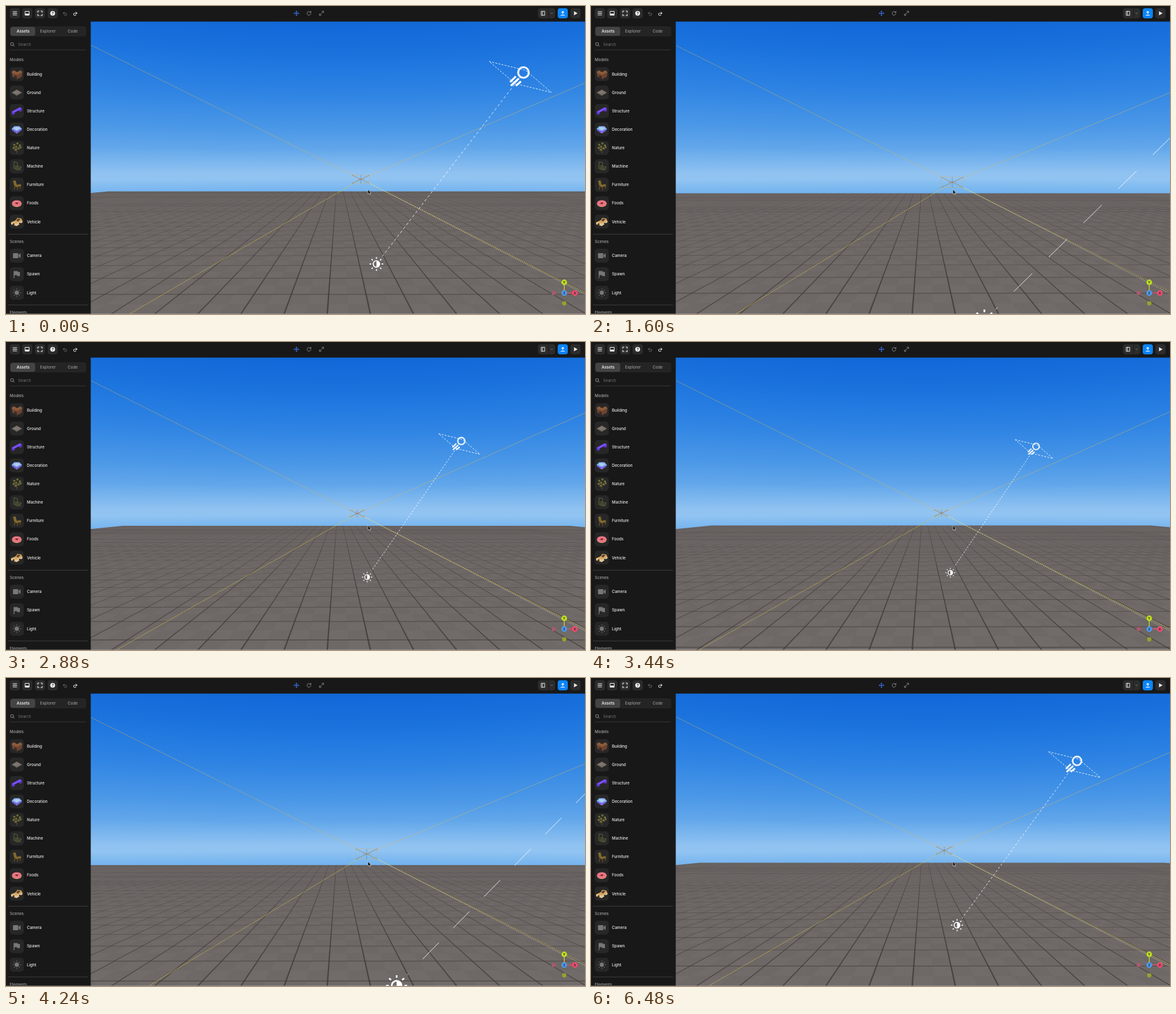
These frames come from a looping animation (912 by 486 pixels, 6.56 s). An HTML page with a canvas:

```html
<!DOCTYPE html>
<html lang="en">
<head>
<meta charset="utf-8">
<title>Scene editor</title>
<style>
html, body { margin: 0; width: 100%; height: 100%; overflow: hidden; background: #171717; }
canvas, svg { position: absolute; left: 0; top: 0; width: 912px; height: 486px; display: block; }
text { font-family: Inter, Roboto, sans-serif; font-size: 6.2px; font-weight: 500; fill: #ececec; }
</style>
</head>
<body>
<canvas id="view" width="912" height="486"></canvas>
<svg id="ui" viewBox="0 0 912 486"></svg>
<script>
const LOOP = 6560, STEP = 80;
const VX = 523, VY = 258, HORIZON = 256;
const g = document.getElementById('view').getContext('2d');

// Camera travel over time: [ms, distance]
const keys = [[0, .289], [800, .567], [1600, .555], [2400, .172], [3440, 0], [4240, .534],
  [5120, .3], [5500, .296], [5840, .318], [6480, .197], [6560, .289]];
const slope = i => (keys[i + 1][1] - keys[i][1]) / (keys[i + 1][0] - keys[i][0]);
const tangents = keys.map((_, i) => {
  if (!i || i === keys.length - 1) return 0;
  const a = slope(i - 1), b = slope(i);
  return a * b > 0 ? 2 * a * b / (a + b) : 0;
});
tangents[0] = slope(0);
tangents[keys.length - 2] = slope(keys.length - 3);

function travel(t) {
  let i = 0;
  while (i < keys.length - 2 && t >= keys[i + 1][0]) i++;
  const [t0, a] = keys[i], [t1, b] = keys[i + 1], h = t1 - t0, u = (t - t0) / h;
  const s = u * u * (3 - 2 * u);
  return a + (b - a) * s + h * u * (1 - u) * (tangents[i] * (1 - u) - tangents[i + 1] * u);
}

function path(points, close) {
  g.beginPath();
  points.forEach(([x, y], i) => i ? g.lineTo(x, y) : g.moveTo(x, y));
  if (close) g.closePath();
}
function stroke(points, color, width, dash = [], close = false) {
  g.strokeStyle = color;
  g.lineWidth = width;
  g.setLineDash(dash);
  path(points, close);
  g.stroke();
  g.setLineDash([]);
}
function gradient(y0, y1, stops) {
  const grad = g.createLinearGradient(0, y0, 0, y1);
  stops.forEach(([y, c]) => grad.addColorStop((y - y0) / (y1 - y0), c));
  return grad;
}

const sky = gradient(24, 296, [[24, '#1167d7'], [80, '#1b73de'], [140, '#2f84e3'], [190, '#4896e7'],
  [225, '#61a6ea'], [246, '#7bb6ee'], [263, '#90c2f1'], [272, '#92c4f2'], [284, '#7fbaf0'], [296, '#70b1ee']]);
const earth = gradient(289, 486, [[289, '#696362'], [340, '#6e6867'], [486, '#716b6a']]);

const TILE = .0904, FOCUS = 400, DROP = 122.3, NEAR = .525, LEFT = -3.04, RIGHT = 3.28, FAR = 3.65;
const px = (x, z) => VX + FOCUS * x / z;
const py = z => HORIZON + DROP / z;

// Bands of the dome rise towards the sides
function drawSky() {
  g.fillStyle = sky;
  for (let x = 132; x < 912; x += 4) {
    const bend = Math.hypot(1, (x + 2 - VX) / 750);
    g.save();
    g.translate(0, HORIZON);
    g.scale(1, bend);
    g.translate(0, -HORIZON);
    g.fillRect(x, 20, 4, 280);
    g.restore();
  }
}

function quad(x0, x1, z0, z1) {
  g.moveTo(px(x0, z0), py(z0));
  g.lineTo(px(x1, z0), py(z0));
  g.lineTo(px(x1, z1), py(z1));
  g.lineTo(px(x0, z1), py(z1));
  g.closePath();
}

function drawGround(d) {
  const far = FAR - d, x0 = -.0226, z0 = 1.175 - d, half = TILE / 2;
  g.beginPath();
  quad(LEFT, RIGHT, far, NEAR);
  g.fillStyle = earth;
  g.fill();

  // faint checks
  g.beginPath();
  for (let r = Math.floor((NEAR - z0) / half); z0 + r * half < 1.9; r++) {
    const za = Math.max(NEAR, z0 + r * half), zb = z0 + (r + 1) * half;
    const reach = Math.ceil(zb / half) + 1;
    const row = r + 1000;
    for (let c = -reach; c <= reach; c++)
      if ((c + row) & 1) quad(x0 + c * half, x0 + (c + 1) * half, zb, za);
  }
  g.fillStyle = 'rgba(30,24,22,.04)';
  g.fill();

  // grid
  const w = .0016;
  g.beginPath();
  for (let n = Math.ceil((LEFT - x0) / TILE); x0 + n * TILE < RIGHT; n++) {
    const x = x0 + n * TILE;
    quad(x - w, x + w, far, NEAR);
  }
  g.fillStyle = 'rgba(60,54,52,.75)';
  g.fill();
  g.beginPath();
  for (let n = Math.ceil((NEAR - z0) / TILE); z0 + n * TILE < far; n++) {
    const z = z0 + n * TILE;
    quad(LEFT, RIGHT, z + w, z - w);
  }
  g.fillStyle = 'rgba(60,54,52,.65)';
  g.fill();
}

function drawFrustum(d) {
  const k = 1.5 / (1.5 - d), x = VX + 29 * k, y = HORIZON + 14 * k;
  const w = 11 * k, h = 5.2 * k, dots = [2, 1];
  const ray = (ex, ey, color) => stroke([[x, y], [ex, ey]], color, .8, dots);
  ray(134, 61 + 2.5 * d, 'rgba(222,178,84,.85)');
  ray(912, 110 + 30 * d + 33 * d * d, 'rgba(222,184,92,.85)');
  ray(170 + 62 * d + 76 * d * d, 486, 'rgba(222,200,64,.9)');
  ray(912, 453 - 4 * d, 'rgba(226,204,64,.95)');
  stroke([[x + w, y + h], [912, 456 - 4 * d]], 'rgba(245,242,215,.8)', .8, [1.5, 1.5]);
  stroke([[x - w, y - h], [x + w, y - h], [x + w, y + h], [x - w, y + h]], 'rgba(224,175,80,.75)', .8, dots, true);
  stroke([[x - w, y - h], [x + w, y + h]], 'rgba(70,60,60,.6)', .7, dots);
  stroke([[x - w, y + h], [x + w, y - h]], 'rgba(70,60,60,.7)', .7, dots);
  stroke([[x, y - h], [x, y + h]], 'rgba(50,70,100,.45)', .7);
  stroke([[x - w * .4, y], [x + w * .4, y]], 'rgba(225,100,60,.6)', .7);
}

function drawLamp(x, y, s) {
  g.save();
  g.translate(x, y);
  g.scale(s, s);
  for (let i = 0; i < 8; i++) {
    const a = i * Math.PI / 4, c = Math.cos(a), n = Math.sin(a);
    stroke([[c * 5.8, n * 5.8], [c * 7.7, n * 7.7]], '#fff', 1.2);
  }
  g.beginPath();
  g.arc(0, 0, 3.6, 0, 7);
  g.lineWidth = 1.2;
  g.stroke();
  g.beginPath();
  g.arc(0, 0, 3.6, -Math.PI / 2, Math.PI / 2);
  g.fillStyle = '#fff';
  g.fill();
  g.restore();
}

function drawBeam(x, y, k) {
  g.save();
  g.translate(x, y);
  g.scale(k, k);
  stroke([[-29.9, -14.9], [4.9, -6.4], [29.9, 14.9], [-4.9, 6.4]], 'rgba(255,255,255,.9)', .9 / k, [3 / k, 2 / k], true);
  g.beginPath();
  g.arc(3, -4.3, 5.1, 0, 7);
  g.lineWidth = 1.9;
  g.stroke();
  stroke([[-9.8, 4.9], [-4.3, -.6]], '#fff', 1.9);
  stroke([[-9.1, 8.5], [-1.5, 1.4]], '#fff', 1.9);
  stroke([[-4.3, 8.5], [.6, 4.3]], '#fff', 1.9);
  g.restore();
}

function drawLight(d) {
  const s = 1 / (1 - d), k = .74 / (.74 - d);
  const sx = VX + 43 * s, sy = VY + 106 * s, bx = VX + 175 * k, by = VY - 89 * k;
  // dashes halve in steps with the distance
  const period = 19.2 * k / (k < 2.4 ? 4 : d > .56 ? 2 : 1);
  const gap = 11 * s, part = gap / Math.hypot(bx - sx, by - sy);
  const start = [sx + (bx - sx) * part, sy + (by - sy) * part];
  g.lineDashOffset = gap - .85 * period;
  stroke([start, [bx, by]], 'rgba(255,255,255,.9)', .9, [period * .53, period * .47]);
  g.lineDashOffset = 0;
  drawLamp(sx, sy, s);
  drawBeam(bx, by, k);
}

function render(t) {
  const d = travel(t);
  drawSky();
  drawGround(d);
  drawFrustum(d);
  drawLight(d);
}

// Interface
const rect = (x, y, w, h, fill, r = 0) => `<rect x="${x}" y="${y}" width="${w}" height="${h}" rx="${r}" fill="${fill}"/>`;
const text = (x, y, s, extra = '') => `<text x="${x}" y="${y + 2.25}" ${extra}>${s}</text>`;
const line = (d, color, w = 1) => `<path d="${d}" fill="none" stroke="${color}" stroke-width="${w}" stroke-linecap="round" stroke-linejoin="round"/>`;
const shape = (d, fill) => `<path d="${d}" fill="${fill}"/>`;
const dot = (x, y, r, fill) => `<circle cx="${x}" cy="${y}" r="${r}" fill="${fill}"/>`;
const at = (x, y, s) => `<g transform="translate(${x} ${y})">${s}</g>`;

const models = [
  ['Building', shape('M-8-4L-4-6 0-3 6-6 9-3 8 4 1 8-7 4Z', '#6b4430') + shape('M-8-4L-4-6 0-3 6-6 9-3 1 1-7-1Z', '#8a5a3c') + shape('M-4 2L0 4 0 7-4 5Z', '#3a251b')],
  ['Ground', shape('M-8 0L0-4.5 8 0 0 4.5Z', '#7d756d') + shape('M-8 0L0 4.5 8 0 8 1 0 5.5-8 1Z', '#514b45')],
  ['Structure', shape('M-8 1L5-6 8-4 8 0 4 1 3-1-3 2-4 6-8 5Z', '#5a35cc') + shape('M-8 1L5-6 8-4-5 3Z', '#7a4ff2')],
  ['Decoration', shape('M-8-1L-4-5 4-5 8-1 8 1 0 6.5-8 1Z', '#5d62d8') + shape('M-8-1L-4-5 4-5 8-1 0 3Z', '#86b4ee') + shape('M-5-1.5L0-4 5-1.5 0 1Z', '#b9cdf0') + shape('M-7 1.5L0 4.5 7 1.5 0 6.5Z', '#a55fd8')],
  ['Nature', line('M0 8L0 0M0 3L-4-2M0 2L4-3', '#6a5a32') + [[-4, -5], [1, -7], [5, -4], [-1, -2], [3, 1], [-5, 0], [6, -1], [-2, 3]].map(p => dot(...p, 1.7, '#74713a')).join('')],
  ['Machine', line('M-4-7L-5 3 5 6 7 1-3-1M-4-7L1-6 1 0', '#59613a', 1) + shape('M-6 3L-1 0 7 3 1 7Z', '#454a31')],
  ['Furniture', shape('M-6-6L-2-7 0 0 6-1 7 2 0 4-4 2Z', '#80682e') + line('M-3 3L-4 7M1 4L1 8M6 2L5 6', '#6a5423', 1.2)],
  ['Foods', `<ellipse rx="7.5" ry="5" fill="#d89764" cy="1"/><ellipse rx="7.5" ry="4.8" fill="#ea7482"/><ellipse rx="2.4" ry="1.3" fill="#6d2e39"/>`],
  ['Vehicle', shape('M-9 1L-2-2 1-6 7-5 9-1 0 7-9 4Z', '#d7a763') + shape('M-1-2L2-5 6-4 2 0Z', '#5d4631') + shape('M-9 1L0 3 9-1 9 1 0 7-9 4Z', '#e3c596') + dot(-5, 4, 1.4, '#222') + dot(5, 3, 1.4, '#222')],
];
const sunRays = [0, 1, 2, 3, 4, 5, 6, 7].map(i => `<path d="M0-5V-6.3" stroke="#777" stroke-width="1.2" transform="rotate(${i * 45})"/>`).join('');
const scenes = [
  ['Camera', rect(-6, -4, 8.5, 8, '#777', 1) + shape('M3-1L6-4V4L3 1Z', '#777')],
  ['Spawn', shape('M-5-5H1L2-3.5H5V3H1L0 1.5H-3.7V6H-5Z', '#777')],
  ['Light', dot(0, 0, 3.4, '#777') + sunRays],
];
const item = (y, [name, icon]) => rect(6, y - 11, 22, 22, '#272727', 5) + at(17, y, icon) + text(33, y, name);
const button = (x, icon, fill = '#2c2c2c') => at(x, 11.5, rect(-8, -8, 16, 16, fill, 4) + icon);
const W = '#efefef', G = '#8b8b8b', mid = 'text-anchor="middle" ';

function buildUi() {
  let s = rect(0, 0, 912, 24.6, '#181818') + rect(0, 24, 133.5, 462, '#181818');
  s += button(14, line('M-3-2.5H3M-3 0H3M-3 2.5H3', W));
  s += button(33.5, line('M-3-3H3V3H-3Z', W) + rect(-3, .5, 6, 2.5, W));
  s += button(53.5, line('M-3.5-1.5V-3.5H-1.5M1.5-3.5H3.5V-1.5M3.5 1.5V3.5H1.5M-1.5 3.5H-3.5V1.5', W, 1.1));
  s += button(73.5, dot(0, 0, 3.8, W) + `<text y="2.1" ${mid} style="font-size:5.8px;font-weight:700;fill:#222">?</text>`);
  s += at(93, 12, line('M-1-2.5L-3-.7-1 1M-3-.7H1A1.7 1.7 0 0 1 1 2.7H-1', '#666', .9));
  s += at(109, 12, line('M1-2.5L3-.7 1 1M3-.7H-1A1.7 1.7 0 0 0-1 2.7H1', W, .9));
  s += at(457.5, 11.5, line('M-3.5 0H3.5M0-3.5V3.5M-2.5-1L-3.6 0-2.5 1M2.5-1L3.6 0 2.5 1M-1-2.5L0-3.6 1-2.5M-1 2.5L0 3.6 1 2.5', '#3b78f0', .9));
  s += at(477.3, 11.5, line('M2.4-1.8A3 3 0 1 0 3 .6M3-3.2V-1.3H1', G, .9));
  s += at(497, 11.5, line('M-3 3L3-3M.8-3.2H3.2V-.8M-.8 3.2H-3.2V.8', G, .9));
  s += rect(838, 3.5, 27, 16, '#2c2c2c', 4) + rect(854, 3.5, .7, 16, '#181818');
  s += at(846, 11.5, line('M-2.6-3.2H2.6V3.2H-2.6ZM-.9-3V3', W, .9)) + at(859.5, 11.5, line('M-1.4-.7L0 .7 1.4-.7', G, .8));
  s += button(877, line('M0 1V-3M-1.7-1.4L0-3.1 1.7-1.4M-2.8 3H2.8', '#fff', 1.1), '#0b84f5');
  s += button(897, shape('M-2.3-3.3L3.3 0-2.3 3.3Z', W));

  s += rect(6, 32, 120.5, 16, '#242424', 4) + rect(7, 33, 39, 14, '#444', 3.5);
  s += text(27, 40, 'Assets', mid + 'style="font-weight:600"');
  s += text(66, 40, 'Explorer', mid + 'style="fill:#999"') + text(105, 40, 'Code', mid + 'style="fill:#999"');
  s += at(10, 60.5, `<circle cx="-.4" cy="-.4" r="2.4" fill="none" stroke="#aaa" stroke-width=".8"/>` + line('M1.4 1.4L3 3', '#aaa', .8));
  s += text(19, 60.8, 'Search', 'style="fill:#747474;font-weight:400"') + rect(6, 68.8, 120, .8, '#3c3c3c');

  const head = 'style="fill:#a6a6a6"';
  s += text(6, 85, 'Models', head);
  models.forEach((m, i) => s += item(107.4 + 29.12 * i, m));
  s += rect(3, 359.7, 126, .8, '#444') + text(6, 371.5, 'Scenes', head);
  scenes.forEach((m, i) => s += item(394 + 29.2 * i, m));
  s += rect(3, 471.4, 126, .8, '#444') + text(6, 483.3, 'Elements', head) + rect(0, 484.8, 133.5, 1.2, '#181818');
  s += rect(0, 485.4, 912, .6, 'rgba(200,200,200,.55)');

  const axis = (x, y, c, label) => dot(x, y, 4.4, c) + `<text x="${x}" y="${y + 2}" ${mid} style="font-size:5.4px;font-weight:600;fill:#222">${label}</text>`;
  s += line('M879.3 440V449', '#c5dc28', 1.2) + line('M883 452.8H892', '#ee4d70', 1.2);
  s += dot(862.7, 452.8, 3.4, '#a55c69') + dot(879.3, 469.2, 3.4, '#98a12f');
  s += axis(879.3, 436, '#bfe01f', 'Y') + axis(896, 452.8, '#f34b70', 'X') + axis(879.3, 452.8, '#4b9df2', 'Z');
  s += `<path d="M570 289.5V297L571.7 295.4 572.8 298 574 297.5 572.9 295H575.2Z" fill="#111" stroke="#eee" stroke-width=".5"/>`;
  document.getElementById('ui').innerHTML = s;
}

let start = null, shown = -1;
function tick(now) {
  if (start === null) start = now;
  const t = Math.floor((now - start) % LOOP / STEP) * STEP;
  if (t !== shown) render(shown = t);
  requestAnimationFrame(tick);
}
buildUi();
render(0);
requestAnimationFrame(tick);
</script>
</body>
</html>
```
